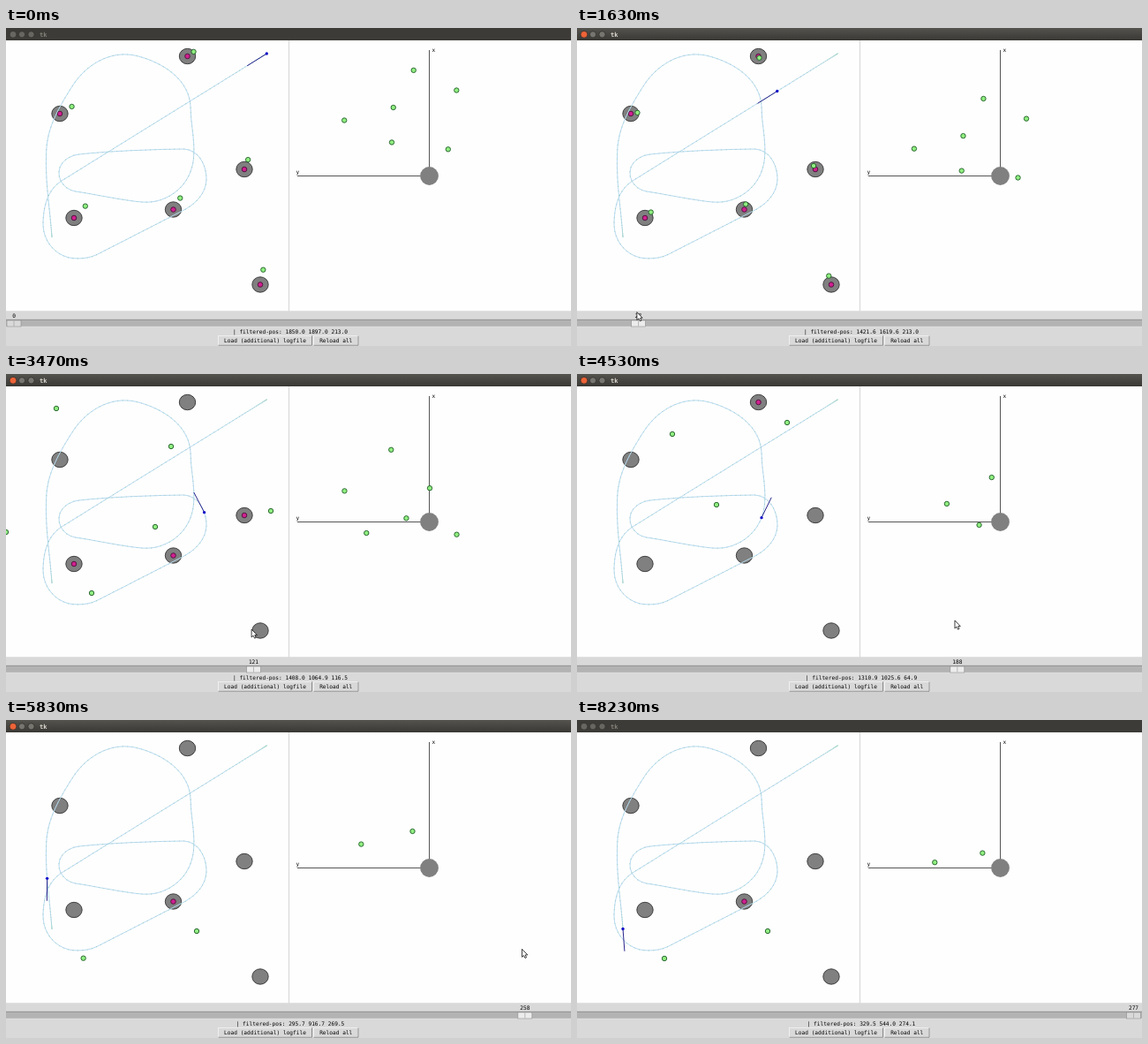
Animation, 640 px wide and 360 px high, one loop 8.26 s. Source, as an HTML page:

```html
<!DOCTYPE html>
<html lang="en">
<head>
<meta charset="utf-8">
<title>Log viewer</title>
<style>
  html, body { margin: 0; width: 100%; height: 100%; overflow: hidden; background: #d9d9d9; }
  svg { display: block; width: 640px; height: 360px; }
  text { font: 6.18px "DejaVu Sans Mono", monospace; }
  .mid { text-anchor: middle; }
</style>
</head>
<body>
<svg viewBox="0 0 640 360">
  <defs>
    <linearGradient id="bar" x2="0" y2="1">
      <stop offset="0" stop-color="#55534e"/><stop offset="1" stop-color="#393834"/>
    </linearGradient>
    <clipPath id="world"><rect y="14" width="319" height="306"/></clipPath>
  </defs>
  <rect width="640" height="360" fill="#d9d9d9"/>
  <rect id="title" width="640" height="14"/>
  <g id="buttons" stroke="#2c2b28" stroke-width=".7">
    <circle id="close" cx="8" cy="7.3" r="3.9"/>
    <circle cx="18" cy="7.3" r="3.6" fill="#77756f"/>
    <circle cx="28.5" cy="7.3" r="3.6" fill="#77756f"/>
  </g>
  <text id="name" x="38" y="10" style="font-size:7px;font-weight:bold">tk</text>
  <rect y="14" width="640" height="307" fill="#fefefe"/>
  <path d="M320.5 14V321M0 320.8H640" stroke="#d9d9d9" stroke-width="1.2"/>

  <g clip-path="url(#world)">
    <g id="landmarks"></g>
    <path id="track" fill="none" stroke="#b8daf4"/>
    <path id="samples" fill="none" stroke="#9fd2c0" stroke-width="1.2" stroke-linecap="round"/>
    <g id="worldDots"></g>
    <line id="heading" stroke="#28248c"/>
    <circle id="robot" r="1.7" fill="#1410c8"/>
  </g>

  <path d="M479.5 25V167.5M330 167.5H479.5" stroke="#555" fill="none"/>
  <text x="482.6" y="27.3">x</text>
  <text x="328.6" y="164.6">y</text>
  <circle cx="479.5" cy="167.5" r="10.4" fill="#808080"/>
  <g id="sensorDots"></g>

  <rect y="330" width="640" height="8.5" fill="#b3b3b3"/>
  <path d="M0 330.3H640" stroke="#828282" stroke-width=".7"/>
  <path d="M0 338.3H640" stroke="#f2f2f2" stroke-width=".7"/>
  <g id="thumb">
    <rect x="-8" y="331" width="16" height="7" stroke="#8c8c8c" stroke-width=".6"/>
    <path d="M0 331.5V337.5" stroke="#a0a0a0" stroke-width=".7"/>
  </g>
  <text id="index" class="mid" y="328.3"></text>
  <text id="status" class="mid" x="322" y="346"></text>
  <g id="commands"></g>
  <path id="pointer" d="M0 0V9L2 7.2L3.5 10.2L5 9.5L3.7 6.6H6.3Z" fill="#fff" stroke="#111" stroke-width=".8"/>
</svg>
<script>
const LOOP = 8260, LAST = 277;
const $ = id => document.getElementById(id);
const rad = deg => deg * Math.PI / 180;
const toX = x => x * .16 - .7;
const toY = y => 320 - y * .1534;

function set(el, attrs) {
  for (const key in attrs) el.setAttribute(key, attrs[key]);
}
function add(parent, tag, attrs) {
  const el = document.createElementNS('http://www.w3.org/2000/svg', tag);
  set(el, attrs);
  return parent.appendChild(el);
}
const show = (el, on) => set(el, { visibility: on ? 'visible' : 'hidden' });

// Linear interpolation over rows of [key, ...values].
function sample(rows, at) {
  if (at <= rows[0][0]) return rows[0].slice(1);
  const n = rows.findIndex(row => row[0] >= at);
  if (n < 0) return rows[rows.length - 1].slice(1);
  const a = rows[n - 1], b = rows[n], u = (at - a[0]) / (b[0] - a[0]);
  return a.slice(1).map((v, k) => v + (b[k + 1] - v) * u);
}

// Ends of the straight legs and arcs: x, y, accumulated heading.
const corners = [
  [1850, 1897, 213], [398, 958, 213], [267, 639, 270], [504, 385, 360], [648, 414, 388],
  [1254, 737, 388], [1423, 971, 450], [1254, 1193, 541], [523, 1154, 546], [379, 1017, 630],
  [498, 880, 711], [961, 802, 714], [1293, 984.7, 782.4], [1311, 1499, 811],
  [931.8, 1880.1, 885.3], [473, 1656, 959], [292, 1206, 986], [329.5, 544, 994.1]
];

// Dense rows of [distance, x, y, heading] along the drive.
const drive = [[0, ...corners[0]]];
for (let n = 1; n < corners.length; n++) {
  const [x0, y0, h0] = corners[n - 1], [x1, y1, h1] = corners[n];
  const arm = Math.hypot(x1 - x0, y1 - y0) / 3 / Math.cos(rad(h1 - h0) / 4) ** 2;
  for (let k = 1; k <= 30; k++) {
    const u = k / 30, v = 1 - u;
    const curve = (p0, p1, trig) => v * v * v * p0 + 3 * v * v * u * (p0 + arm * trig(rad(h0)))
      + 3 * v * u * u * (p1 - arm * trig(rad(h1))) + u * u * u * p1;
    const x = curve(x0, x1, Math.cos), y = curve(y0, y1, Math.sin);
    const [d, px, py] = drive[drive.length - 1];
    drive.push([d + Math.hypot(x - px, y - py), x, y, h0 + (h1 - h0) * u]);
  }
}

// Constant speed with a ramp at each end.
const SPEED_UP = 24, SLOW_DOWN = 16;
const ramp = (steps, length) => steps < length ? steps * steps / (2 * length) : steps - length / 2;
const cruise = drive[drive.length - 1][0] / (LAST - (SPEED_UP + SLOW_DOWN) / 2);
function pose(i) {
  const distance = i < LAST / 2
    ? cruise * ramp(i, SPEED_UP)
    : drive[drive.length - 1][0] - cruise * ramp(LAST - i, SLOW_DOWN);
  const [x, y, heading] = sample(drive, distance);
  return { x, y, deg: heading % 360 };
}

const landmarks = [[205.5, 32], [61, 97], [270, 160], [77, 215], [189.5, 205.5], [288, 290.5]];

// Visible index range, landmark if any, and drifted positions by index.
const detections = [
  { to: 200, home: landmarks[0], drift: [[121, 187, 82], [188, 238, 55]] },
  { to: 245, home: landmarks[1], drift: [[121, 57, 39], [188, 108, 68], [220, 122, 72]] },
  { to: 150, home: landmarks[2], drift: [[121, 300, 155]] },
  { to: 150, home: landmarks[3], drift: [[121, 97, 248]] },
  { to: 203, home: landmarks[4], drift: [[121, 169, 173], [188, 158, 148]] },
  { to: 70, home: landmarks[5], drift: [] },
  { from: 100, to: 140, drift: [[121, 0, 179]] },
  { from: 212, to: 232, drift: [[220, 0, 129]] },
  { from: 205, to: LAST, drift: [[220, 65, 269], [LAST, 99, 270]] },
  { from: 250, to: LAST, drift: [[LAST, 216, 239]] }
];

// Early ranges read a little short; a first bias fades, then drift takes over.
function detect({ home, drift }, i, px, py) {
  if (!home) return sample(drift, i);
  const bias = Math.max(0, 1 - i / 27), [hx, hy] = home;
  const near = [hx - .045 * (hx - px) + 3 * bias, hy - .045 * (hy - py) - 5 * bias];
  return sample([[27, ...near], ...drift], i);
}

// The slider is dragged in steady strokes with one short rest.
const strokes = [[1090, 0], [1630, 27], [3470, 121], [5030, 220], [5240, 220], [6120, LAST]];
const handHeight = [[0, 331], [121, 289], [188, 279], [220, 262], [LAST, 258]];
const ENTER = 150, GRAB = 930, RELEASE = 6950, LEAVE = 7400, GONE = 7650;

function pointerAt(t, i, thumbX) {
  const coming = 1 - Math.min(1, (t - ENTER) / (GRAB - ENTER));
  const going = Math.max(0, (t - LEAVE) / (GONE - LEAVE));
  return [
    thumbX - 1.5 - i / 140 + 626 * coming + 15 * going,
    sample(handHeight, i)[0] - 26 * coming + 35 * Math.sin(Math.PI * coming) - 18 * going
  ];
}

for (const [cx, cy] of landmarks)
  add($('landmarks'), 'ellipse', { cx, cy, rx: 9.2, ry: 8.7, fill: '#808080', stroke: '#333', 'stroke-width': .9 });
const matches = landmarks.map(([cx, cy]) =>
  add($('landmarks'), 'circle', { cx, cy, r: 2.8, fill: '#d02090', stroke: '#4a1038', 'stroke-width': .9 }));
const dots = id => detections.map(() =>
  add($(id), 'circle', { r: 2.7, fill: '#90ee80', stroke: '#1f5c28', 'stroke-width': .9 }));
const worldDots = dots('worldDots'), sensorDots = dots('sensorDots');

const trace = Array.from({ length: LAST + 1 }, (_, i) => {
  const p = pose(i);
  return toX(p.x).toFixed(1) + ' ' + toY(p.y).toFixed(1);
});
set($('track'), { d: 'M' + trace.join('L') });
set($('samples'), { d: trace.map(at => `M${at}h.01`).join('') });

for (const [x, width, label] of [[240.5, 106, 'Load (additional) logfile'], [348.5, 50.5, 'Reload all']]) {
  add($('commands'), 'rect', { x, y: 348.5, width, height: 10.5, fill: '#d9d9d9', stroke: '#f4f4f4', 'stroke-width': .8 });
  add($('commands'), 'path', { d: `M${x} 359.2h${width}v-10.7`, fill: 'none', stroke: '#828282', 'stroke-width': .9 });
  add($('commands'), 'text', { class: 'mid', x: x + width / 2, y: 356 }).textContent = label;
}

function render(t) {
  const i = Math.round(sample(strokes, t)[0]);
  const { x, y, deg } = pose(i), cos = Math.cos(rad(deg)), sin = Math.sin(rad(deg));
  const px = toX(x), py = toY(y);
  set($('robot'), { cx: px, cy: py });
  set($('heading'), { x1: px, y1: py, x2: toX(x + 165 * cos), y2: toY(y + 165 * sin) });

  const seen = [];
  detections.forEach((item, k) => {
    const visible = i >= (item.from || 0) && i <= item.to;
    show(worldDots[k], visible);
    show(sensorDots[k], visible);
    if (!visible) return;
    const [cx, cy] = detect(item, i, px, py);
    const dx = (cx - px) / .16, dy = (py - cy) / .1534;
    seen.push([cx, cy]);
    set(worldDots[k], { cx, cy });
    set(sensorDots[k], {
      cx: 479.5 - .0727 * (dy * cos - dx * sin),
      cy: 167.5 - .0708 * (dx * cos + dy * sin)
    });
  });
  landmarks.forEach(([lx, ly], k) =>
    show(matches[k], seen.some(([sx, sy]) => Math.hypot(sx - lx, sy - ly) < 47)));

  const thumbX = 9 + i * 621.5 / LAST;
  set($('thumb'), { transform: `translate(${thumbX} 0)`, fill: t > GRAB && t < RELEASE ? '#ececec' : '#d9d9d9' });
  set($('index'), { x: thumbX });
  $('index').textContent = i;
  $('status').textContent = '| filtered-pos: ' + [x, y, deg].map(v => v.toFixed(1)).join(' ');

  const active = t > 1000 && t < 7900;
  set($('title'), { fill: active ? 'url(#bar)' : '#3c3b37' });
  set($('buttons'), { opacity: active ? 1 : .75 });
  set($('close'), { fill: active ? '#ee6338' : '#77756f' });
  set($('name'), { fill: active ? '#dfdbd2' : '#858279' });

  show($('pointer'), t > ENTER && t < GONE);
  set($('pointer'), { transform: `translate(${pointerAt(t, i, thumbX)})` });
}

const start = performance.now();
function tick() {
  render((performance.now() - start) % LOOP);
  requestAnimationFrame(tick);
}
tick();
</script>
</body>
</html>
```
